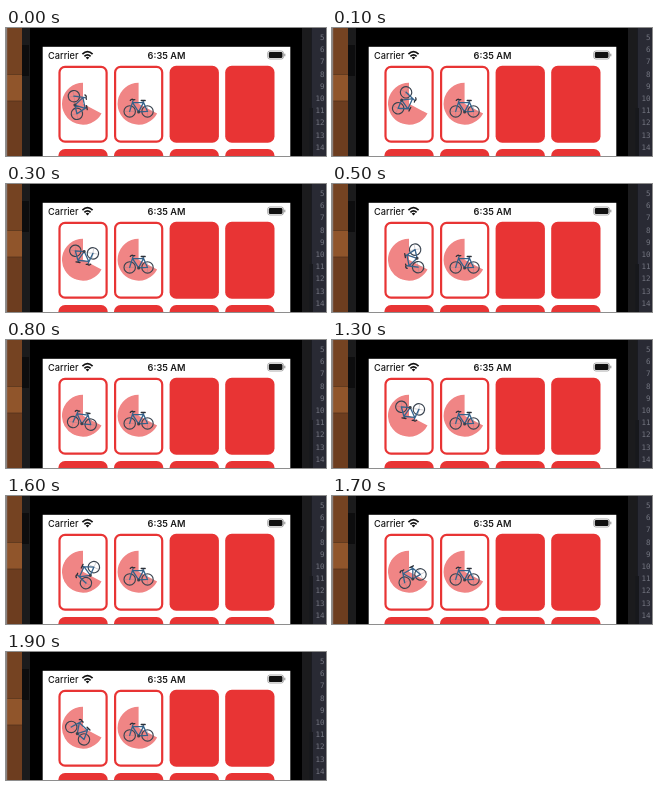
An HTML page for the animation above (2 s loop, 320 by 128 pixels).

```html
<!DOCTYPE html>
<html lang="en">
<head>
<meta charset="utf-8">
<title>Memory cards</title>
<style>
  html, body { margin: 0; width: 100%; height: 100%; overflow: hidden; background: #000; }
  svg { display: block; width: 100vw; height: 100vh; }
  .status { font: 500 9.2px Inter, Roboto, sans-serif; fill: #1a1a1a; }
  .time { font-weight: 600; text-anchor: middle; }
  .gutter { font: 7.5px "DejaVu Sans Mono", monospace; fill: #747681; text-anchor: end; }
</style>
</head>
<body>
<svg viewBox="0 0 320 128">
  <defs>
    <g id="bike" fill="none" stroke-linecap="round" stroke-linejoin="round">
      <g stroke="#39434f" stroke-width="1.15">
        <circle cx="-8.9" cy="7.7" r="5.7"/>
        <circle cx="8.9" cy="7.7" r="5.7"/>
      </g>
      <g stroke="#8c8794" stroke-width=".35">
        <path d="M-13.5 7.7h9.2M-8.9 3v9.4M4.3 7.7h9.2M8.9 3v9.4"/>
      </g>
      <path d="M-8.9 7.7L-5.6-3.1M-5.2-1L5-1.3L0 8.2L-5.4 0M4.4-2.6L5-1.3L8.9 7.7L0 8.2" stroke="#35628a" stroke-width="1.3"/>
      <path d="M-8.3-3.3Q-7-5.2-5.2-3.9L-3.8-4.1M2.6-3.2H6.6" stroke="#2c3038" stroke-width="1.3"/>
      <circle cy="8.2" r="1.5" fill="#3a414a"/>
    </g>
  </defs>

  <rect width="320" height="128"/>
  <g>
    <rect width="16" height="128" fill="#754322"/>
    <rect y="46" width="16" height="27" fill="#90552b"/>
    <rect y="73" width="16" height="55" fill="#6d3d1f"/>
    <path d="M0 46.5H16M0 73H16" stroke="#50301b" stroke-width=".7"/>
    <rect width="1.2" height="128" fill="#8d8480"/>
  </g>
  <rect x="16" width="8" height="128" fill="#1b1b1c"/>
  <rect x="16" y="17" width="7" height="31" fill="#0d0d0e"/>
  <rect x="296" width="9.5" height="128" fill="#1b1b1d"/>
  <rect x="305.5" width="14.5" height="128" fill="#292a34"/>
  <rect x="303.5" y="80" width="3.5" height="48" fill="#17181c"/>
  <g id="lines" class="gutter"></g>

  <rect x="36.7" y="18.8" width="247.6" height="110" fill="#fff"/>
  <text class="status" x="42" y="30.5">Carrier</text>
  <text class="status time" x="160.5" y="30.5">6:35 AM</text>
  <g fill="none" stroke="#111" stroke-width="1.7">
    <path d="M76.4 26.1Q81.5 21.2 86.6 26.1M78.4 28.3Q81.5 25.3 84.6 28.3"/>
    <path d="M79.7 29.5L81.5 31.4L83.3 29.5Q81.5 28 79.7 29.5Z" fill="#111" stroke="none"/>
    <rect x="261.7" y="23" width="15.8" height="8" rx="2.2" stroke="#888" stroke-width=".7"/>
    <rect x="262.8" y="24" width="13.7" height="6.1" rx="1.4" fill="#111" stroke="none"/>
    <path d="M278.8 25.7v2.6" stroke="#888" stroke-width="1"/>
  </g>
  <g id="cards"></g>
</svg>
<script>
  const RED = '#e83434', PINK = '#f08585';
  const TURN = 1000, START = 80, CENTER_Y = 75.7;
  const cards = document.getElementById('cards');

  function add(parent, tag, attrs, text = '') {
    const el = document.createElementNS('http://www.w3.org/2000/svg', tag);
    for (const key in attrs) el.setAttribute(key, attrs[key]);
    el.textContent = text;
    parent.append(el);
    return el;
  }

  function addCard(x, y, open) {
    const inset = open ? 1.1 : 0;
    add(cards, 'rect', {
      x: x + inset, y: y + inset, width: 49.3 - 2 * inset, height: 77 - 2 * inset, rx: 6.6 - inset,
      fill: open ? '#fff' : RED, stroke: open ? RED : 'none', 'stroke-width': 2.2
    });
  }

  function addPie(x, y, r) {
    const end = 28 * Math.PI / 180;
    const px = x + r * Math.cos(end), py = y + r * Math.sin(end);
    add(cards, 'path', { d: `M${x} ${y}L${px} ${py}A${r} ${r} 0 1 1 ${x} ${y - r}Z`, fill: PINK });
  }

  function pose(bike, angle) {
    bike.el.setAttribute('transform', `translate(${bike.x} ${CENTER_Y}) rotate(${angle})`);
  }

  const bikes = [];
  for (let col = 0; col < 4; col++) {
    const x = 52.4 + col * 55.6;
    addCard(x, 37.8, col < 2);
    addCard(x, 121, false);
    if (col < 2) {
      const mid = x + 24.6;
      addPie(mid, CENTER_Y, 21);
      bikes.push({ x: mid, el: add(cards, 'use', { href: '#bike' }) });
    }
  }
  pose(bikes[1], 0);

  const lines = document.getElementById('lines');
  for (let n = 5; n < 16; n++) add(lines, 'text', { x: 318.5, y: 12 + (n - 5) * 12.2 }, n);

  const begin = performance.now();
  function tick() {
    const ms = performance.now() - begin;
    pose(bikes[0], START + ms % TURN / TURN * 360);
    requestAnimationFrame(tick);
  }
  tick();
</script>
</body>
</html>
```
